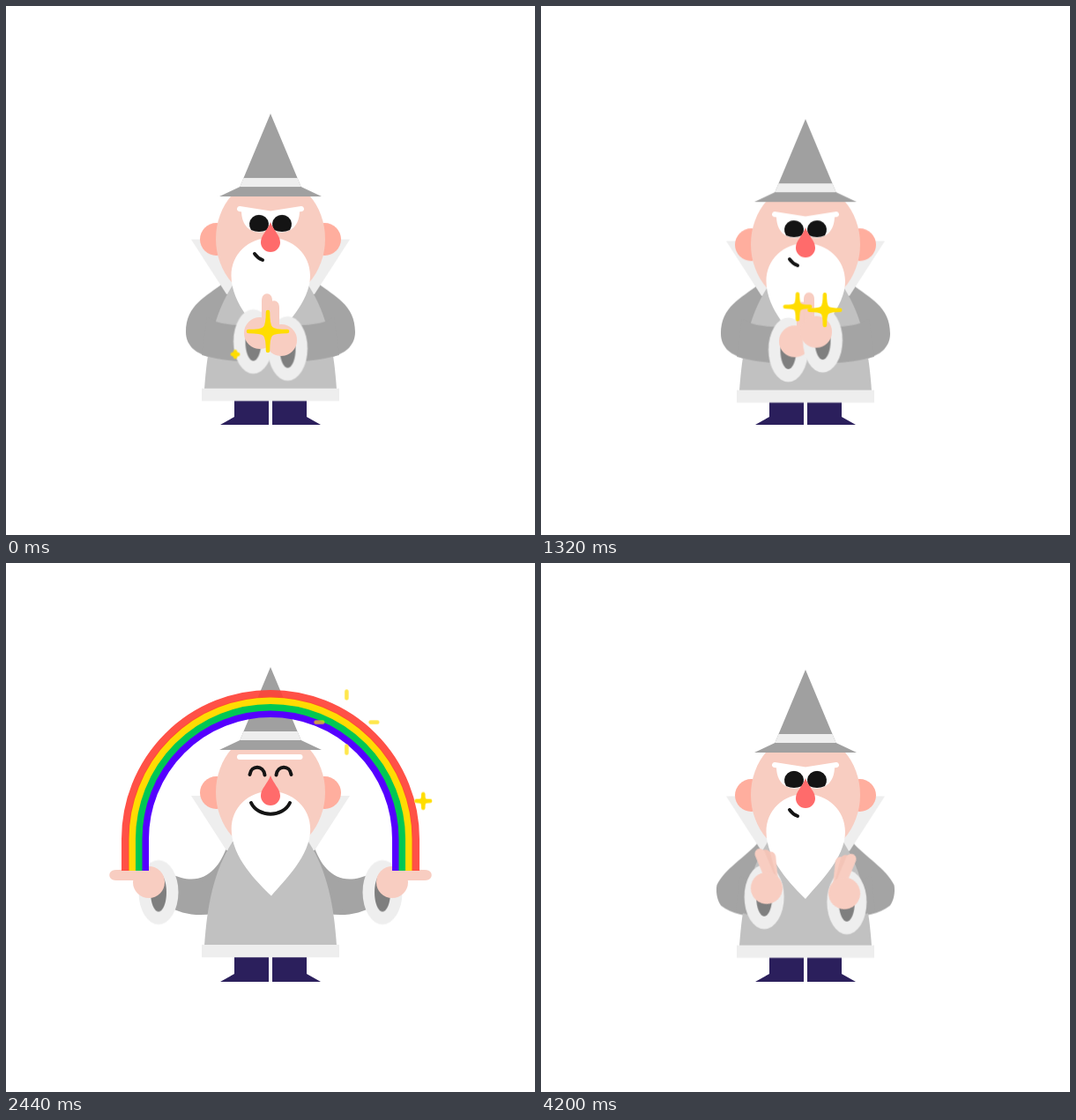
Recreate the animation shown at these times as an HTML page. Size 600x600 px, loop 4.24 s.

```html
<!DOCTYPE html>
<html lang="en">
<head>
<meta charset="utf-8">
<title>Wizard and rainbow</title>
<style>
html, body { margin: 0; width: 100%; height: 100%; overflow: hidden; background: #fff; }
svg { display: block; width: 100vw; height: 100vh; }
.line { fill: none; stroke: #141414; stroke-width: 4; stroke-linecap: round; }
.trim { fill: #eee; }
.sleeve { fill: #a4a4a4; }
.hat { fill: #a0a0a0; }
.skin { fill: #f8cdc1; }
.finger { stroke: #f8cdc1; stroke-width: 11.5; stroke-linecap: round; }
.finger.rear { stroke: #f3c4b7; }
#brow { fill: none; stroke: #fff; stroke-width: 6; stroke-linecap: round; stroke-linejoin: round; }
#rainbow { fill: none; stroke-width: 8.5; }
#sparks path { fill: #fd0; stroke: #fd0; stroke-width: 4.5; stroke-linecap: round; stroke-linejoin: round; vector-effect: non-scaling-stroke; }
</style>
</head>
<body>
<svg viewBox="0 0 600 600">
  <defs>
    <polygon id="boot" points="259,440 298,440 298,475 243,475 259,466" fill="#2b1f5c"/>
    <circle id="ear" cx="238.5" cy="260.5" r="18.5" fill="#ffae9e"/>
    <path id="pupil" d="M278 250A11 11 0 1 1 296 250Q287 254 278 250Z" fill="#141414"/>
  </defs>
  <use href="#boot"/>
  <use href="#boot" transform="translate(600) scale(-1 1)"/>

  <g class="body">
    <path class="sleeve back"/>
    <path class="sleeve back" transform="translate(600) scale(-1 1)"/>
    <path class="trim" d="M210 264H390L350 326H250Z"/>
    <path fill="#c1c1c1" d="M257 316H343C365 350 372 390 375 434H225C228 390 235 350 257 316Z"/>
    <rect class="trim" x="222" y="433" width="156" height="14.3"/>
  </g>

  <g id="head">
    <use href="#ear"/>
    <use href="#ear" transform="translate(600) scale(-1 1)"/>
    <ellipse class="skin" cx="300" cy="260" rx="62" ry="70"/>
    <g id="glare">
      <path fill="#fff" d="M267 228L300 232L333 228C333 258 303 256 300 246C297 256 267 258 267 228Z"/>
      <use href="#pupil"/>
      <use href="#pupil" x="26"/>
    </g>
    <path id="joy" class="line" d="M276.5 240C278 229 292 229 293.5 240.5M306.5 240.5C308 229 322 229 323.5 240"/>
    <path id="brow"/>
    <path id="beard" fill="#fff"/>
    <path fill="#ff6b6b" d="M300 241C303 250 311 256 311 264A11 11 0 0 1 289 264C289 256 297 250 300 241Z"/>
    <path id="mouth" class="line"/>
    <path class="hat" d="M300 118L334.7 201L358 212H242L265.3 201Z"/>
    <path class="trim" d="M269.5 191H330.5L334.7 201H265.3Z"/>
  </g>

  <g class="body">
    <path class="sleeve front"/>
    <path class="sleeve front" transform="translate(600) scale(-1 1)"/>
  </g>
  <g id="left"></g>
  <g transform="translate(600) scale(-1 1)"><g id="right"></g></g>
  <g id="rainbow"></g>
  <g id="sparks"></g>
</svg>

<script>
const LOOP = 4240, PUSH = 1480, LIFT = 1640, OPEN = 1960, CLOSE = 4000;
const $ = s => document.querySelectorAll(s);
const path = d => `path("${d}")`;
const move = (x, y, turn = 0) => `translate(${x}px, ${y}px) rotate(${turn}deg)`;

// keys: [ms, value, easing to the next key]; the first value closes the loop
function animate(el, prop, keys, delay = 0) {
  const all = [...keys, [LOOP, keys[0][1]]];
  el.animate(
    all.map(([t, value, easing = 'linear']) => ({ offset: t / LOOP, [prop]: value, easing })),
    { duration: LOOP, iterations: Infinity, delay });
}
const each = (sel, prop, keys) => $(sel).forEach(el => animate(el, prop, keys));

// The shared rhythm: sink slowly, throw the arms up, spread them, clap
const cycle = (clap, sunk, lifted, open) => [
  [0, clap], [PUSH, sunk, 'ease-in'], [LIFT, lifted, 'ease-out'], [OPEN, open], [CLOSE, open, 'ease-in']];

function add(parent, tag, attrs = {}) {
  const el = document.createElementNS('http://www.w3.org/2000/svg', tag);
  for (const k in attrs) el.setAttribute(k, attrs[k]);
  return parent.appendChild(el);
}

// Body, head and sleeves
const sink = (...ys) => cycle(...ys.map(y => move(0, y)));
each('.body', 'transform', sink(.7, 2.8, -1.5, 0));
each('#head', 'transform', sink(4, 11, .2, 0));

const bent = path('M246 314C228 328 204 338 204 369C204 378 208 384 212 388C222 397 240 401 262 402L270 350Z');
const lifted = path('M251 317C240 330 204 350 204 374C204 383 210 390 214 393C222 398 240 400 262 402L270 350Z');
const spread = path('M251 320C242 348 222 370 186 352C180 362 178 380 181 388C198 398 215 401 235 398L270 350Z');
each('.back', 'd', cycle(bent, bent, lifted, spread));
const across = path('M228 352C238 359 250 361 280 362L280 402C258 403 240 400 222 395Z');
const tucked = path('M218 360C222 362 226 362 228 362L228 395C226 396 222 396 218 392Z');
each('.front', 'd', cycle(across, across, tucked, tucked));

// Face
const mood = (bad, good) => [[0, bad], [1460, bad, 'ease-in-out'], [1580, good], [4020, good, 'ease-in-out'], [4140, bad]];
const swap = (bad, good) => [[0, bad, 'step-end'], [1520, good, 'step-end'], [4080, bad]];
each('#brow', 'd', mood(path('M265 226L300 231.5L335 226'), path('M265 220L300 220L333.5 220')));
each('#mouth', 'd', mood(path('M282 277C284 280 287 282.5 291 284'), path('M278 272C286 289 314 289 322 272')));
each('#glare', 'opacity', swap(1, 0));
each('#joy', 'opacity', swap(0, 1));

// The beard swings out with the lift and settles
function beard(swing) {
  const tip = 300 + swing, side = swing * .2, y = 378 - Math.abs(swing) / 2;
  return path(`M${255.5 + side} 302C${255.5 + side} 277 275 259 300 259C325 259 ${345 + side} 277 ${345 + side} 302` +
    `C${345 + side} 332 ${tip + 15} 360 ${tip} ${y}C${tip - 15} 363 ${255.5 + side} 334 ${255.5 + side} 302Z`);
}
const swings = [[0, beard(0)], [PUSH, beard(0)]];
for (let t = 0; t <= 1540; t += 55) {
  swings.push([LIFT + t, beard(17 * Math.exp(-t / 420) * Math.cos(2 * Math.PI * t / 440))]);
}
each('#beard', 'd', swings);

// Hands; side is 1 or -1, so that they rub against each other
function hand(sel, side) {
  const g = $(sel)[0];
  const cuff = add(g, 'g');
  add(cuff, 'ellipse', { rx: 22.5, ry: 36.5, class: 'trim' });
  add(cuff, 'ellipse', { rx: 9, ry: 22, fill: '#7f7f7f' });
  const palm = add(g, 'g');
  for (const i of [2, 1, 0]) {
    const finger = add(palm, 'path', { d: `M0 -8H${i * 2 - 39}`, class: i % 2 ? 'finger rear' : 'finger' });
    const fan = a => move(0, 0, a * i);
    animate(finger, 'transform', [
      [0, fan(0)], [PUSH, fan(0)], [LIFT, fan(14)], [OPEN, fan(0)], [CLOSE, fan(0)], [4190, fan(11)]]);
  }
  add(palm, 'circle', { r: 18, class: 'skin' });
  animate(g, 'transform', sink(-4 * side, 6.5 * side, -1 * side, 0));
  const clap = move(288, 375, 90);
  animate(palm, 'transform', cycle(clap, clap, move(225, 338.5, 16), move(162, 362)));
  const near = move(280.5, 384.5);
  animate(cuff, 'transform', cycle(near, near, move(233, 356.5), move(173, 373.5)));
}
hand('#left', 1);
hand('#right', -1);

// Rainbow: inner stripes lie under the outer ones
const colors = ['#ff4136', '#ffdc00', '#00c853', '#5500ff'];
for (let i = 3; i >= 0; i--) {
  const arch = (R, gap, top, foot) => {
    const r = R - gap * i - 4.25, cy = top + R;
    return path(`M${300 - r} ${foot}V${cy}A${r} ${r} 0 0 1 ${300 + r} ${cy}V${foot}`);
  };
  const stripe = add($('#rainbow')[0], 'path', { stroke: colors[i] });
  const seed = arch(30, 2, 340, 371);
  animate(stripe, 'd', cycle(seed, seed, arch(98, 6.2, 231.5, 327), arch(169, 7.5, 144, 349)));
  const fade = 2400 + i * 35;
  animate(stripe, 'opacity', [[0, 0], [1500, 0], [1520, 1], [fade, 1], [fade + 490, 0]]);
}

// A sparkle is a star that grows, then breaks into four flying dashes
function sparkle(x, y, birth) {
  const g = add($('#sparks')[0], 'g', { transform: `translate(${x} ${y})` });
  const star = add(g, 'path', { d: 'M0 -22C0 -2 2 0 22 0C2 0 0 2 0 22C0 2 -2 0 -22 0C-2 0 0 -2 0 -22Z' });
  const burst = add(g, 'path', { d: 'M21 0h6M-21 0h-6M0 21v6M0 -21v-6' });
  const delay = birth - LOOP;
  animate(star, 'transform', [[0, 'scale(0)'], [15, 'scale(0)'], [200, 'scale(1)'], [215, 'scale(1)']], delay);
  animate(star, 'opacity', [[0, 0, 'step-end'], [15, 1, 'step-end'], [215, 0]], delay);
  animate(burst, 'transform', [[0, 'scale(1)'], [215, 'scale(1)'], [360, 'scale(1.4)']], delay);
  animate(burst, 'opacity', [[0, 0, 'step-end'], [215, 1], [305, 1], [360, 0]], delay);
}

let seed = 7;
const random = () => (seed = seed * 16807 % 2147483647) / 2147483647;

// The clap, the last rub, the throw and the fading arch each get a sparkle
sparkle(297, 369, -200);
sparkle(291, 341, 1187);
sparkle(411, 285, 1540);
sparkle(243, 121, 2640);
// The rest appear around the hands, then along the arch
for (let birth = -40; birth < 3560; birth += 240) {
  const a = Math.PI * (1 + random()), r = 130 + 60 * random();
  if (birth < PUSH) sparkle(300 + 40 * Math.cos(a), 395 + 60 * Math.sin(a), birth);
  else sparkle(300 + r * Math.cos(a), 313 + r * Math.sin(a), birth);
}
each('#sparks', 'opacity', [[0, 1, 'step-end'], [3950, 0, 'step-end']]);
</script>
</body>
</html>
```
